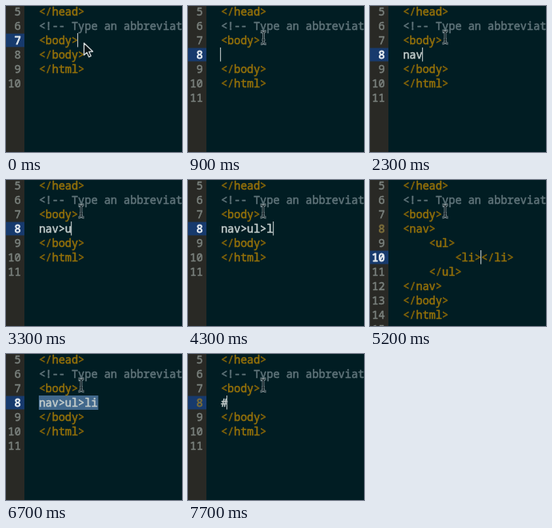
An HTML page with a canvas that plays this animation: 220x183 px, repeating every 8 s.

```html
<!DOCTYPE html>
<html>
<head>
<meta charset="utf-8">
<style>
html, body { margin: 0; width: 100%; height: 100%; overflow: hidden; background: #011d23; }
canvas { display: block; }
</style>
</head>
<body>
<canvas id="stage" width="220" height="183"></canvas>
<script>
const ctx = document.getElementById('stage').getContext('2d');
const LOOP = 8000, LEFT = 41.2, ADVANCE = 8.15, ROW = 18, FIRST = 5;
const FONT = '13.58px "Noto Sans Mono", "DejaVu Sans Mono", monospace';
const COLOR = {
  back: '#011d23', gutter: '#292925', active: '#173a6d', number: '#7b827e',
  bracket: '#836409', tag: '#93700a', comment: '#5f7379', plain: '#c3cccb',
  select: '#41688c', warning: '#786b39', caret: '#aeb7b8'
};

// Typed text on line 8, by start time.
const typing = [
  [700, ''], [1900, 'n'], [2000, 'na'], [2300, 'nav'], [2900, 'nav>'],
  [3300, 'nav>u'], [3400, 'nav>ul'], [4000, 'nav>ul>'], [4300, 'nav>ul>l'],
  [4400, 'nav>ul>li'], [7700, '#']
];
const caretOff = [[1200, 1600], [3800, 4000], [4900, 5200], [5700, 6100], [6700, 7700]];
const between = (t, a, b) => t >= a && t < b;
const column = n => LEFT + n * ADVANCE;
const rowTop = line => (line - FIRST) * ROW - 2;
const baseline = line => rowTop(line) + 14;

// A thin outline gives the text its semibold weight.
function write(text, x, line, color, outline = 0.55) {
  ctx.font = FONT;
  ctx.fillStyle = ctx.strokeStyle = color;
  ctx.lineWidth = outline;
  ctx.lineJoin = 'round';
  ctx.fillText(text, x, baseline(line));
  ctx.strokeText(text, x, baseline(line));
}

function writeCode(text, line) {
  const comment = text.startsWith('<!--');
  const markup = /^\s*</.test(text);
  if (comment || !markup) {
    write(text, LEFT, line, comment ? COLOR.comment : COLOR.plain);
    return;
  }
  for (const part of text.matchAll(/[<>\/]+|\w+/g)) {
    const color = /\w/.test(part[0]) ? COLOR.tag : COLOR.bracket;
    write(part[0], column(part.index), line, color);
  }
}

function editorState(t) {
  const expanded = between(t, 5200, 6700);
  let body = [], active = 7, caret = 6;
  if (expanded) {
    body = ['<nav>', '    <ul>', '        <li></li>', '    </ul>', '</nav>'];
    active = 10;
    caret = 12;
  } else if (t >= 700) {
    const text = typing.filter(step => t >= step[0]).pop()[1];
    body = [text];
    active = 8;
    caret = text.length;
  }
  const lines = ['</head>', '<!-- Type an abbreviation', '<body>', ...body, '</body>', '</html>', ''];
  return {
    lines, active, caret,
    selected: between(t, 6700, 7700),
    warning: expanded || t >= 7200,
    caretShown: !caretOff.some(span => between(t, ...span))
  };
}

function polyline(points, close) {
  ctx.beginPath();
  points.forEach(([x, y]) => ctx.lineTo(x, y));
  if (close) ctx.closePath();
}

function drawArrow(x, y) {
  polyline([[0, 0], [0, 15], [3.6, 11.8], [6.2, 17.4], [8.7, 16.2], [6.2, 10.8], [11, 10.5]]
    .map(p => [p[0] + x, p[1] + y]), true);
  ctx.fillStyle = '#0b1518';
  ctx.fill();
  ctx.strokeStyle = '#d4dadb';
  ctx.lineWidth = 1.3;
  ctx.stroke();
}

function drawBeam(x, y) {
  ctx.beginPath();
  for (const s of [-1, 1]) {
    ctx.moveTo(x + s * 3.5, y - 8);
    ctx.quadraticCurveTo(x, y - 8, x, y - 5);
    ctx.lineTo(x, y + 5);
    ctx.quadraticCurveTo(x, y + 8, x + s * 3.5, y + 8);
  }
  ctx.moveTo(x - 2, y + 3);
  ctx.lineTo(x + 2, y + 3);
  for (const [width, color] of [[2.8, '#8b999d'], [1, '#142328']]) {
    ctx.lineWidth = width;
    ctx.strokeStyle = color;
    ctx.stroke();
  }
}

function drawPointer(t) {
  if (t < 400) return drawArrow(97.5, 46.5);
  const p = Math.min(1, (t - 400) / 600);
  const ease = p * p * (3 - 2 * p);
  drawBeam(99 - 5 * ease, 48 - 9 * ease);
}

function draw(t) {
  const state = editorState(t);
  ctx.fillStyle = COLOR.back;
  ctx.fillRect(0, 0, 220, 183);
  ctx.fillStyle = COLOR.gutter;
  ctx.fillRect(0, 0, 23, 183);
  ctx.fillStyle = COLOR.active;
  ctx.fillRect(0, rowTop(state.active) + 0.6, 23, ROW - 1.2);
  if (state.selected) {
    ctx.fillStyle = COLOR.select;
    ctx.fillRect(41, rowTop(8), 9 * ADVANCE + 1, ROW);
  }

  state.lines.forEach((text, i) => {
    const line = FIRST + i, active = line === state.active;
    const marked = line === 8 && state.warning;
    const color = marked ? COLOR.warning : active ? '#e3e9ef' : COLOR.number;
    write(String(line), 18.6 - ADVANCE * String(line).length, line, color, active || marked ? 0.9 : 0.5);
    writeCode(text, line);
  });

  if (state.caretShown) {
    ctx.fillStyle = COLOR.caret;
    ctx.fillRect(Math.floor(column(state.caret) - 0.4), rowTop(state.active), 1.2, ROW - 0.5);
  }
  drawPointer(t);
}

function frame() {
  draw(performance.now() % LOOP);
  requestAnimationFrame(frame);
}
frame();
</script>
</body>
</html>
```
